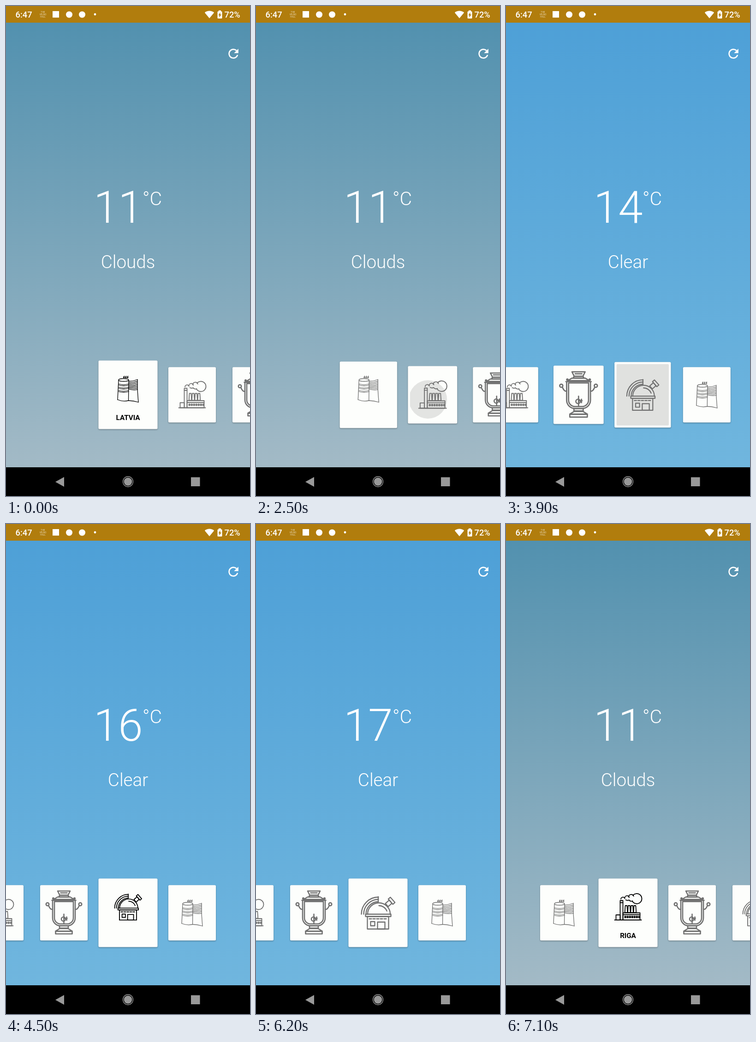
An HTML page with a canvas for the animation above (8 s loop, 529x1058 px).

```html
<!DOCTYPE html>
<html lang="en">
<head>
<meta charset="utf-8">
<title>Weather carousel</title>
<style>
html, body { margin: 0; width: 100%; height: 100%; overflow: hidden; background: #000; }
canvas { display: block; width: 529px; height: 1058px; }
</style>
</head>
<body>
<canvas id="stage" width="529" height="1058"></canvas>
<script>
const c = document.getElementById('stage').getContext('2d');
const W = 529, LOOP = 8000, MID = W / 2, PITCH = 139, ROW = 839.5;
const FONT = 'Roboto, "Open Sans", sans-serif';

// a tap opens the next card, a swipe goes one back
const taps = [2300, 2961, 3528, 5073];
const swipes = [5800, 6210, 6510];
const TAP = 540, LOAD = 340, SETTLE = 260;

const cards = [
  { draw: tower, temp: 11, label: 'LATVIA' },
  { draw: factory, temp: 11, label: 'RIGA' },
  { draw: samovar, temp: 14 },
  { draw: observatory, temp: 16 },
  { draw: tower, temp: 17 }
];

const clamp = v => Math.max(0, Math.min(1, v));
const mix = (a, b, k) => a + (b - a) * k;
const ramp = (t, a, b) => clamp((t - a) / (b - a));
const ease = u => (1 - Math.cos(Math.PI * u)) / 2;
const rgb = (a, b, k) => `rgb(${a.map((v, i) => Math.round(mix(v, b[i], k)))})`;

function pageAt(t) {
  const fwd = taps.reduce((p, s) => p + ease(ramp(t, s + 100, s + 500)), 0);
  return swipes.reduce((p, s) => p - ease(ramp(t, s, s + 300)), fwd);
}
const nearness = (i, t) => 1 - clamp(Math.abs(i - pageAt(t)));

// drawing helpers
function disc(x, y, r) {
  c.beginPath();
  c.arc(x, y, r, 0, 7);
  c.fill();
}
function arc(x, y, r, a = 0, b = 2) {
  c.beginPath();
  c.arc(x, y, r, a * Math.PI, b * Math.PI);
  c.stroke();
}
function bow(x1, y1, x2, y2, sag = 0) {
  c.beginPath();
  c.moveTo(x1, y1);
  c.quadraticCurveTo((x1 + x2) / 2, (y1 + y2) / 2 + 2 * sag, x2, y2);
  c.stroke();
}
function shape(x, y, w, h, r = 0) {
  c.beginPath();
  c.roundRect(x, y, w, h, r);
}
function box(...a) {
  shape(...a);
  c.stroke();
}
// symmetric trapezoid, half-widths a above and b below
function trap(x, y, h, a, b) {
  c.beginPath();
  c.moveTo(x - a, y);
  c.lineTo(x + a, y);
  c.lineTo(x + b, y + h);
  c.lineTo(x - b, y + h);
  c.closePath();
  c.stroke();
}
function tri(x1, y1, x2, y2, x3, y3) {
  c.beginPath();
  c.moveTo(x1, y1);
  c.lineTo(x2, y2);
  c.lineTo(x3, y3);
  c.fill();
}
function text(s, x, y, size, weight, align = 'left') {
  c.font = `${weight} ${size}px ${FONT}`;
  c.textAlign = align;
  c.fillText(s, x, y);
}

// icons, centred on 0,0 of a small card
function tower() {
  c.lineWidth = 1.3;
  c.beginPath();
  c.ellipse(-9.5, -19.5, 11, 3, 0, 0, 7);
  c.stroke();
  bow(-20.5, -19, -22.5, 23, -0.5);
  bow(1.5, -19, 1, 25);
  bow(-22.5, 23, 1, 25, 2);
  for (let y = -11; y < 6; y += 7) {
    bow(-20.5, y, 1.5, y, 1.8);
    bow(-20.5, y + 2.5, 1.5, y + 2.5, 1.8);
  }
  for (let k = 0; k < 7; k++) bow(1.5, -17 + k * 2.8, 20.5, -20.5 + k * 3.6, 1.2);
  bow(20.5, -20.5, 20.5, 1, -0.5);
  bow(20.5, 1, 22.5, 28.5, 1);
  bow(1, 25, 22.5, 28.5, -0.8);
  for (let x = -9; x < 0; x += 4) {
    tri(x + 1, -29.5, x + 2, -24, x - 1.5, -25);
    disc(x, -25, 1.5);
  }
}

function factory() {
  c.lineWidth = 1.8;
  bow(-29, 28, 29, 28);
  box(-17, -14, 6, 42);
  bow(-17, -9.5, -11, -9.5);
  box(-26, 17, 9, 11);
  box(-11, 12.5, 37, 15.5);
  bow(-11, 16.5, 26, 16.5);
  for (let x = -4; x < 18; x += 6.3) trap(x, -3, 15, 1.9, 2.9);
  for (let x = -7; x < 24; x += 5) box(x, 20, 2.4, 3);
  arc(19, -18, 11, 1.22, 2.85);
  for (let k = 0; k < 3; k++) arc(-11 + k * 9, -17 - k * 2.3, 4.4 + k * 0.6, 1, 1.9);
  bow(-5, -15.5, 2, -15, 1);
  bow(2, -15, 10, -13, 1.5);
}

function samovar() {
  c.lineWidth = 2.6;
  trap(0, -47, 9, 13.5, 9);
  bow(-7, -43, 7, -43);
  trap(0, -38, 3.5, 9, 11);
  trap(0, -34, 5, 14, 22);
  bow(-26, -27, 26, -27);
  for (let inset = 0; inset < 5; inset += 4)
    box(inset - 24.5, inset * 0.7 - 27, 49 - 2 * inset, 55 - 1.7 * inset, [0, 0, 17 - inset, 17 - inset]);
  for (const s of [-1, 1]) {
    disc(s * 23, -31, 2.6);
    arc(s * 35.5, -18.5, 3.2);
    bow(s * 33, -15, s * 24.5, -8, 3);
  }
  bow(0, 3, 0, 23);
  arc(-1, 13.5, 4.5);
  bow(0, 12, 7, 12);
  bow(6, 9, 6, 16);
  box(-9.5, 28, 19, 5);
  trap(0, 34, 5.5, 9, 18);
  trap(0, 40, 5.5, 18, 18);
}

function observatory() {
  c.scale(0.805, 0.805);
  c.lineWidth = 2.3;
  for (let r = 27; r < 40; r += 5) arc(1, 3, r, 1, 1.5);
  bow(0.5, -34.5, 0.5, -24);
  arc(2, 3, 24.5, 1, 2);
  arc(2, 3, 18.5, 1.5, 1.88);
  box(-27, 3, 55, 5);
  box(-23, 8, 46, 27);
  c.setLineDash([5, 3]);
  bow(-19, 13, 20, 13);
  c.setLineDash([]);
  box(-16, 19, 9, 9);
  box(-1, 20, 16, 15);
  c.translate(25, -22);
  c.rotate(-0.72);
  box(-8, -4.5, 11, 9);
  box(3, -7.5, 6, 15);
}

function press(i, t, x, l, top, w, h) {
  const age = t - taps[i - 1];
  if (!(age > 0 && age < TAP)) return;
  c.save();
  shape(l + 4.5, top + 4.5, w - 9, h - 9, 2);
  c.clip();
  const a = 0.135 * clamp(age / 270) * (1 - ramp(age, 345, TAP));
  c.fillStyle = `rgba(0,0,0,${a})`;
  disc(x - 10, ROW + 10, 41 * (age / 200) ** 2);
  c.restore();
}

function card(i, t) {
  const x = MID + (i - pageAt(t)) * PITCH, near = nearness(i, t);
  const w = mix(103, 128, near), h = mix(119.5, 148, near);
  const l = x - w / 2, top = ROW - h / 2;

  c.save();
  c.shadowColor = 'rgba(0,0,0,.3)';
  c.shadowBlur = 3;
  c.shadowOffsetY = 1.5;
  c.fillStyle = '#fdfefc';
  shape(l, top, w, h, 2.5);
  c.fill();
  c.restore();
  press(i, t, x, l, top, w, h);

  // a card that has come to rest makes room for its label, then darkens
  const open = ramp(nearness(i, t - SETTLE), 0.8, 1) * ramp(near, 0.6, 0.85);
  const busy = taps.some(s => t >= s && t < s + TAP);
  const dark = busy ? 0 : open * ramp(near, 0.97, 1);
  const size = mix(w / 103, 1, open);
  c.save();
  c.translate(x, ROW - 12.5 * open);
  c.scale(size, size);
  c.strokeStyle = c.fillStyle = rgb([112, 112, 112], [0, 0, 0], dark);
  c.lineJoin = c.lineCap = 'round';
  cards[i].draw();
  c.restore();

  c.fillStyle = `rgba(0,0,0,${dark})`;
  text(cards[i].label || '', x, 894, 15.2, 700, 'center');
}

function sky(t) {
  const k = clamp(pageAt(t) - 1);
  const g = c.createLinearGradient(0, 36, 0, 996);
  g.addColorStop(0, rgb([82, 145, 175], [78, 160, 215], k));
  g.addColorStop(1, rgb([163, 186, 198], [112, 182, 222], k));
  c.fillStyle = g;
  c.fillRect(0, 36, W, 960);
}

function report(t) {
  const { temp } = cards[Math.round(pageAt(t - LOAD))];
  c.fillStyle = '#fff';
  text(temp, 190, 468, 96, 300);
  text('°C', 296, 430, 41, 300);
  text(temp > 11 ? 'Clear' : 'Clouds', MID, 566, 38.6, 300, 'center');
}

function refresh() {
  c.save();
  c.translate(493, 103);
  c.scale(1.35, 1.35);
  c.strokeStyle = '#fff';
  c.lineWidth = 2;
  arc(0, 0, 7, 0.09, 1.75);
  tri(8, -8, 8, -1, 1, -1);
  c.restore();
}

function statusBar() {
  const gold = '#b17d0d';
  c.fillStyle = gold;
  c.fillRect(0, 0, W, 36);
  c.fillStyle = '#fff';
  text('6:47', 20.5, 25, 18.3, 500);
  text('72%', 473.5, 25, 18.3, 500);
  c.globalAlpha = 0.75;
  ['THE', 'VELNO', 'HALL'].forEach((s, i) => text(s, 80, 14.5 + i * 5, 4.7, 400, 'center'));
  c.globalAlpha = 1;
  c.fillRect(101, 11, 14, 14);
  disc(137, 18.5, 7);
  disc(165, 18.5, 7);
  disc(193, 18, 2.4);
  // signal wedge
  c.beginPath();
  c.moveTo(441, 26.5);
  c.arc(441, 26.5, 16, -0.72 * Math.PI, -0.28 * Math.PI);
  c.fill();
  // charging battery
  shape(458.5, 11.5, 10, 15.5, 1.5);
  c.fill();
  c.fillRect(461, 9.5, 5, 3);
  c.fillStyle = gold;
  tri(464.5, 13.5, 460.5, 20, 464.5, 20);
  tri(462.5, 25, 466.7, 18.3, 462.5, 18.3);
}

function navBar() {
  c.fillStyle = '#000';
  c.fillRect(0, 996, W, 62);
  c.fillStyle = c.strokeStyle = '#999';
  tri(107, 1027.5, 126, 1017, 126, 1038);
  disc(MID, 1027, 8.8);
  c.lineWidth = 1.3;
  arc(MID, 1027, 11);
  c.fillRect(401, 1017.5, 19.5, 19.5);
}

function frame(t) {
  sky(t);
  report(t);
  refresh();
  cards.forEach((_, i) => card(i, t));
  statusBar();
  navBar();
}

const t0 = performance.now();
function tick() {
  frame((performance.now() - t0) % LOOP);
  requestAnimationFrame(tick);
}
tick();
</script>
</body>
</html>
```
